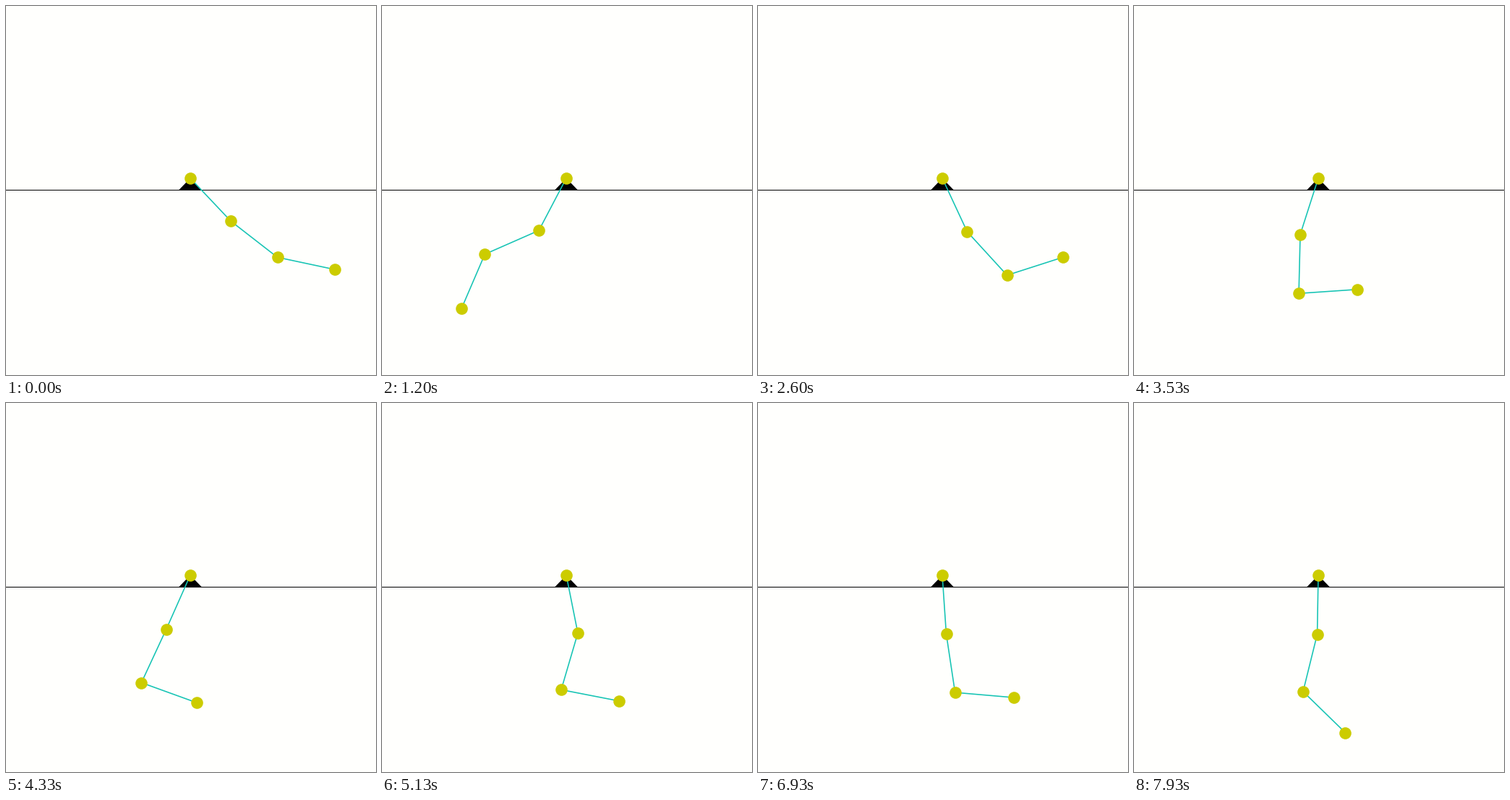
Write a matplotlib script that moves like this. It is 512 px wide and 510 px high and loops after 8 s.

```python
import numpy as np
import matplotlib.pyplot as plt
from matplotlib.animation import FuncAnimation

W, H, DPI = 512, 510, 64
PX = 72 / DPI                  # points per pixel
FRAMES, INTERVAL = 400, 20
STEP = 1000 / 15               # the pose changes 15 times a second
PIVOT = np.array([255.0, 238.0])
LINK = 81.6

# Turning points: time in ms, then each link's angle below the horizontal
FIRST_SWING = np.array([
    (0, 46.6, 37.8, 12), (500, 116, 98, 72), (1200, 117.7, 156.3, 113.3),
    (1730, 88, 98, 68), (2600, 65, 47.5, -17.8), (3533, 107.8, 91.4, -3.9)])
SECOND_SWING = np.array([
    (3600, 0, 0, 0), (4000, 104, 92, 60), (4150, 125, 135, 98),
    (4333, 114, 115, 20), (5133, 78.7, 106.4, 11), (6000, 81.9, 76.6, -12.8),
    (7933, 91, 103.9, 44.2)])


def angles_at(t):
    """Smooth curve through the turning points (cubic Hermite), in radians."""
    keys = SECOND_SWING if t >= SECOND_SWING[0, 0] - 1 else FIRST_SWING
    times, values = keys[:, 0], keys[:, 1:]
    slopes = np.gradient(values, times, axis=0)
    t = np.clip(t, times[0], times[-1])
    i = min(np.searchsorted(times, t, side="right"), len(times) - 1) - 1
    span = times[i + 1] - times[i]
    u = (t - times[i]) / span
    ease = u * u * (3 - 2 * u)
    bend = span * u * (1 - u) * ((1 - u) * slopes[i] - u * slopes[i + 1])
    return np.radians((1 - ease) * values[i] + ease * values[i + 1] + bend)


def joints_at(t):
    angle = angles_at(t)
    links = LINK * np.column_stack([np.cos(angle), np.sin(angle)])
    return PIVOT + np.vstack([[0, 0], np.cumsum(links, axis=0)])


fig = plt.figure(figsize=(W / DPI, H / DPI), dpi=DPI, facecolor="#fffffd")
ax = fig.add_axes([0, 0, 1, 1])
ax.set_xlim(0, W)
ax.set_ylim(H, 0)
ax.axis("off")

ax.fill([0, W, W, 0], [254, 254, 255, 255], color="black", lw=0, zorder=1)
ax.fill([238.5, 255, 271.5], [255, 238, 255], color="black", lw=0, zorder=2)
rods, = ax.plot([], [], color="#16c4b4", lw=1.6 * PX, zorder=3)
balls, = ax.plot([], [], "o", color="#cccc00", ms=16.6 * PX, mew=0, zorder=4)


def draw(frame):
    # pose changes fall up to 14 ms into a frame, so look slightly ahead
    step = int((frame * INTERVAL + 14) / STEP)
    x, y = joints_at(step * STEP).T
    rods.set_data(x, y)
    balls.set_data(x, y)
    return rods, balls


anim = FuncAnimation(fig, draw, frames=FRAMES, interval=INTERVAL,
                     repeat=True, repeat_delay=0, blit=False)
plt.show()
```
